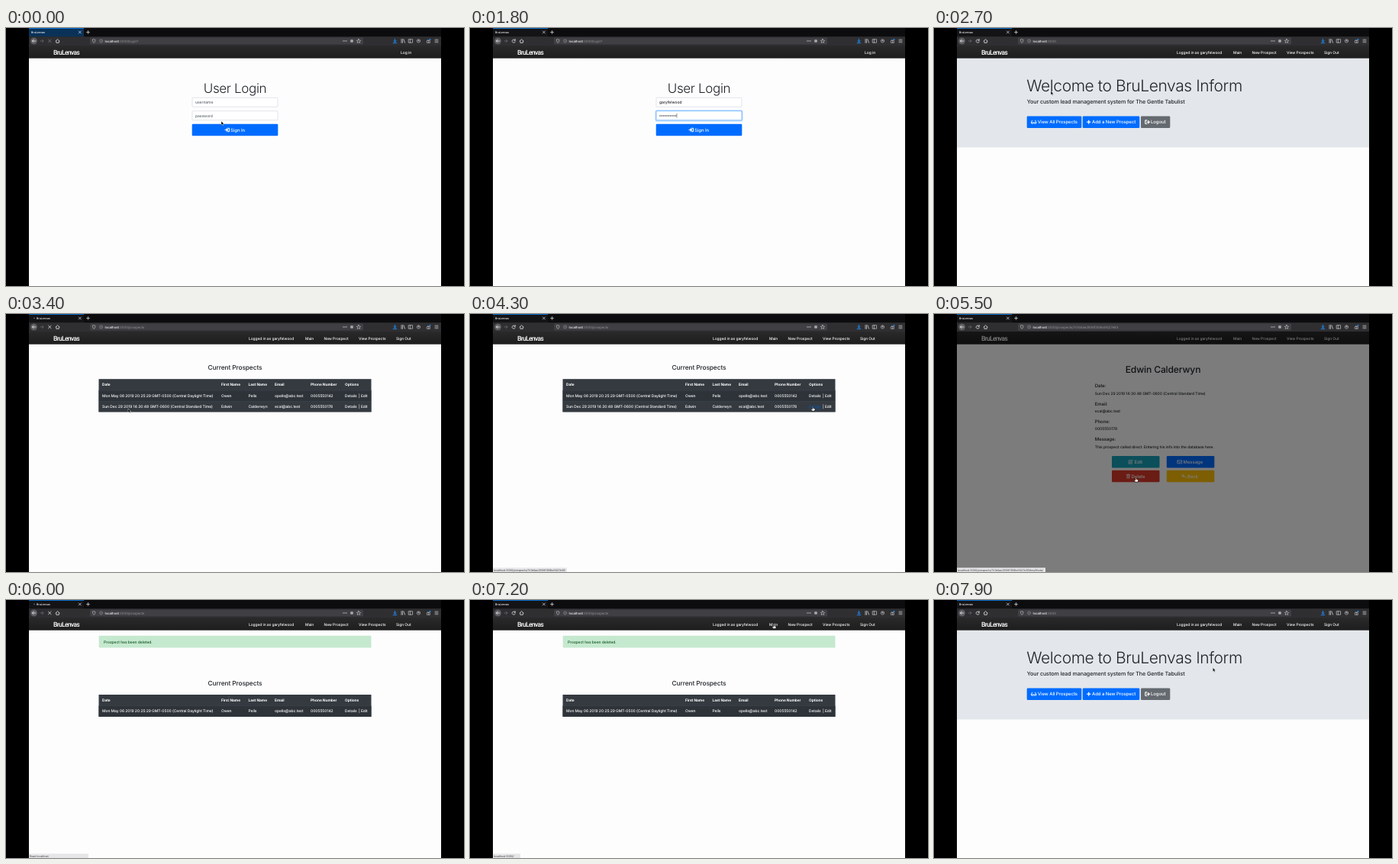
An HTML page that plays this animation: 600 px wide and 338 px high, repeating every 8 s.

```html
<!DOCTYPE html>
<html lang="en">
<head>
<meta charset="utf-8">
<title>Prospect manager demo</title>
<style>
  html, body { margin: 0; width: 100%; height: 100%; overflow: hidden; background: #000; }
  svg { display: block; width: 100vw; height: 100vh; }
  text { font-family: Inter, "Open Sans", sans-serif; letter-spacing: -.012em; text-rendering: geometricPrecision; white-space: pre; }
  .brand { font-family: Roboto, "Open Sans", sans-serif; letter-spacing: -.09em; }
  .title { letter-spacing: -.02em; }
  .line { fill: none; stroke-linecap: round; stroke-linejoin: round; }
</style>
</head>
<body>
<svg id="stage" viewBox="0 0 600 338" xmlns="http://www.w3.org/2000/svg"></svg>
<script>
const LOOP = 8000, STEP = 100;
const BRAND = 'BruLenvas', USER = 'garyfelwood';
const HOST = 'localhost', RECORD = '/prospects/7c1d4ae2906f358bd1427e83';
const INK = '#212529', BLUE = '#006cff', DARK = '#343a40';

// Markup helpers: y is the vertical middle of the capitals
const text = (x, y, str, size = 5, o = {}) =>
  `<text x="${x}" y="${y + size * .36}" font-size="${size}" fill="${o.fill || INK}" ` +
  `font-weight="${o.weight || 450}" text-anchor="${o.anchor || 'start'}" ${o.attr || ''}>${str}</text>`;
const rect = (x, y, w, h, fill, attr = '') =>
  `<rect x="${x}" y="${y}" width="${w}" height="${h}" fill="${fill}" ${attr}/>`;
const line = (d, stroke = '#fff', w = .8) =>
  `<path class="line" d="${d}" stroke="${stroke}" stroke-width="${w}"/>`;
const dot = (x, y, r, fill, attr = '') => `<circle cx="${x}" cy="${y}" r="${r}" fill="${fill}" ${attr}/>`;
const at = (x, y, body) => `<g transform="translate(${x} ${y})">${body}</g>`;
const group = (id, body) => `<g id="${id}">${body}</g>`;

// Icons drawn around their own centre
const icon = {
  signIn: line('M.8-2.3H2.2Q2.8-2.3 2.8-1.6V1.6Q2.8 2.3 2.2 2.3H.8M-2.6 0H.8M-.8-1.6 .9 0-.8 1.6', '#fff', 1.1),
  signOut: line('M-.8-2.3H-2.2Q-2.8-2.3-2.8-1.6V1.6Q-2.8 2.3-2.2 2.3H-.8M-1 0H2.6M1-1.6 2.7 0 1 1.6', '#fff', 1.1),
  glasses: line('M-3.2.7-2.3-2H-1.7M3.2.7 2.3-2H1.7M-3.2.7H-.6V1.4Q-.8 2.2-1.9 2.2T-3.2 1.2ZM3.2.7H.6V1.4Q.8 2.2 1.9 2.2T3.2 1.2ZM-.6.9H.6'),
  plus: line('M-2 0H2M0-2V2', '#fff', 1.3),
  edit: line('M.4-2H-2.5V2.3H1.8V.5M-.8.8-.6-.4 2-2.8 2.9-1.9 .3.6Z', '#fff', .7),
  mail: line('M-2.8-2H2.8V2H-2.8ZM-2.8-1.1 0 .8 2.8-1.1', '#fff', .7),
  trash: line('M-2.3-1.8H2.3M-.8-1.8V-2.6H.8V-1.8M-1.8-1.8-1.6 2.6H1.6L1.8-1.8M-.6-.7V1.6M.6-.7V1.6', '#fff', .6),
  back: line('M2.6 2Q2.6-.6-2.4-.6M-.6-2.4-2.5-.6-.6 1.2', '#fff', .9),
  cross: line('M-1.8-1.8 1.8 1.8M1.8-1.8-1.8 1.8', 'currentColor', .8),
  reload: line('M1.7-1.1A2.1 2.1 0 1 0 2 .8M2-2.3V-.7H.4', '#d8d8da', .8),
};

const button = (x, y, w, h, fill, glyph, gx, tx, label) =>
  rect(x, y, w, h, fill, 'rx="1.3"') + at(gx, y + h / 2, glyph) +
  text(tx, y + h / 2, label, 6, { fill: '#fff', weight: 500 });

const chrome = () => {
  const grey = '#c9c9cc';
  return rect(30, 0, 540, 11.5, '#0c0c0e') + rect(30, 0, 72, 11.5, '#141417') +
    rect(30, 0, 72, 11.5, '#0a3258', 'id="tint"') + rect(30, 0, 72, .9, '#0a78e0') +
    dot(37, 5.5, .8, '#5a87b5', 'id="spin"') +
    text(33, 5.5, BRAND, 3.6, { fill: '#f2f2f4', weight: 500, attr: 'id="tab"' }) +
    line('M95.3 4 98.3 7M98.3 4 95.3 7', '#e6e6e6', .7) + line('M105.5 5.5H109.5M107.5 3.5V7.5', '#e6e6e6', .7) +
    rect(30, 11.2, 540, 11.8, '#2f2f32') + rect(110, 12.4, 358, 9.2, '#404044', 'rx="1"') +
    dot(36.5, 17, 4.5, '#5b5b60') + line('M38.8 17H34.5M36.3 15.1 34.4 17 36.3 18.9', '#eee') +
    line('M45 17H49M47.3 15.2 49.1 17 47.3 18.8', '#68686c') +
    at(57.3, 17, group('reload', icon.reload) + group('stop', icon.cross)) +
    line('M65 17.2 67.6 14.7 70.2 17.2M65.9 16.8V19.4H69.3V16.8', '#ddd', .8) +
    line('M115.2 14.8 117 15.4Q117 18.6 115.2 19.5 113.4 18.6 113.4 15.4Z', grey, .6) +
    line('M126.7 17A2.1 2.1 0 1 1 122.5 17A2.1 2.1 0 1 1 126.7 17M124.6 16.8V18M124.6 15.9V16', '#a0a0a4', .5) +
    [442, 444, 446].map(x => dot(x, 17, .65, grey)).join('') + dot(453, 17, 2.1, '#a4a4a8') +
    line('M462 14.4 462.8 16.2 464.7 16.4 463.3 17.6 463.7 19.5 462 18.5 460.3 19.5 460.7 17.6 459.3 16.4 461.2 16.2Z', grey, .6) +
    line('M509.5 14.3V18M507.8 16.5 509.5 18.2 511.2 16.5M507.3 19.6H511.7', '#1e90ff', .9) +
    line('M518 14.6V19.4M519.6 14.6V19.4M521 14.8 522.6 19.3', grey) +
    line('M527.6 14.8H532.6V19.2H527.6ZM529.4 14.8V19.2', grey, .7) +
    line('M542.7 17A2.2 2.2 0 1 1 538.3 17A2.2 2.2 0 1 1 542.7 17', grey, .6) + dot(540.5, 16.5, .9, grey) +
    line('M551.8 16.6H555.4V19.4H551.8ZM553.6 16.6V19.4M552.6 15.2 553.6 16.4', grey, .6) + dot(555.4, 15, 1.1, '#1e90ff') +
    line('M562 15.2H566M562 17H566M562 18.8H566', grey, .7) +
    `<text x="129.5" y="18.5" font-size="4.35" fill="#f4f4f6" font-weight="500">${HOST}<tspan id="path" fill="#929297" font-weight="400"></tspan></text>`;
};

const navBar = () => {
  const white = { fill: '#fff', weight: 550 };
  const links = [[318, `Logged in as ${USER}`], [392, 'Main'], [416.5, 'New Prospect'],
    [462, 'View Prospects'], [511, 'Sign Out']];
  return rect(30, 23, 540, 16.7, 'url(#nav)') +
    text(62, 32, BRAND, 8.7, { fill: '#fff', attr: 'class="brand"' }) +
    group('guest', text(517, 32, 'Log in', 5, white)) +
    group('member', links.map(([x, s]) => text(x, 32, s, 4.9, white)).join(''));
};

const field = (id, y, hint) =>
  rect(243.2, y - .6, 113.6, 13.7, 'none', `id="${id}Glow" rx="1.6" stroke="#a9d3ff" stroke-width="1.2"`) +
  rect(244, y, 112, 12, '#fff', `id="${id}Box" rx="1" stroke-width=".6"`) +
  text(248, y + 6.2, hint, 5, { attr: `id="${id}Text"` });

const login = () =>
  text(300, 78.4, 'User Login', 17, { weight: 350, anchor: 'middle', attr: 'class="title"' }) +
  field('user', 91.3, 'username') + field('pass', 108.7, 'password') +
  group('dots', Array.from({ length: 10 }, (_, i) => dot(249 + i * 2.27, 115, .75, INK)).join('')) +
  rect(0, 0, .5, 5.6, INK, 'id="caret"') +
  button(243.7, 125.7, 112.6, 15.6, BLUE, icon.signIn, 289.6, 294, 'Sign In');

const welcome = () =>
  rect(30, 39.7, 540, 116.8, '#e3e6ea') +
  text(121.3, 75.6, `Welcome to ${BRAND} Inform`, 21, { weight: 350, attr: 'class="title"' }) +
  text(121.7, 96, 'Your custom lead management system for The Gentle Tabulist', 7.15, { weight: 500 }) +
  button(121.7, 115.4, 71.6, 15.6, BLUE, icon.glasses, 130.6, 135.8, 'View All Prospects') +
  button(194.7, 115.4, 74.6, 15.6, BLUE, icon.plus, 202.7, 207, 'Add a New Prospect') +
  button(271, 115.4, 38.3, 15.6, '#646a70', icon.signOut, 279.6, 284, 'Logout');

const columns = [126, 282, 317.5, 352, 399];
const people = [
  ['Mon May 06 2019 20:25:29 GMT-0500 (Central Daylight Time)', 'Owen', 'Pells', 'opells@abc.test', '0005550142'],
  ['Sun Dec 29 2019 14:30:48 GMT-0600 (Central Standard Time)', 'Edwin', 'Calderwyn', 'ecal@abc.test', '0005550178'],
];
const table = (top, rows, linkId) => {
  const cells = (vals, y, o) => vals.map((s, i) => text(columns[i], y, s, o.size || 4.98, o)).join('');
  const head = { fill: '#fff', weight: 650, size: 4.85 };
  let out = rect(121.5, top, 357, 14.7 + rows.length * 14.2, DARK) +
    cells(['Date', 'First Name', 'Last Name', 'Email', 'Phone Number'], top + 7.4, head) +
    text(444, top + 7.4, 'Options', 4.85, head);
  rows.forEach((row, i) => {
    const y = top + 14.7 + i * 14.2, link = { fill: '#fff', weight: 550 };
    out += rect(121.5, y, 357, 14.2, i % 2 ? DARK : '#2e3339') + rect(121.5, y, 357, .35, '#454d55') +
      cells(row, y + 7, { fill: '#fff' }) +
      text(444, y + 7, 'Details', 4.9, { ...link, attr: i ? `id="${linkId}"` : '' }) +
      text(462, y + 7, '| Edit', 4.9, link);
  });
  return out;
};
const listTitle = y => text(300, y, 'Current Prospects', 8.35, { anchor: 'middle' });

const list = () => listTitle(70) + table(85.2, people, 'details');

const deleted = () =>
  rect(121.7, 46.8, 356.8, 15.7, '#c5e9cf', 'rx="1.2"') +
  text(128, 54.7, 'Prospect has been deleted.', 5, { fill: '#155724' }) +
  listTitle(108.5) + table(124, people.slice(0, 1));

const detail = () => {
  const [date, first, last, email, phone] = people[1];
  const facts = [['Date:', date], ['Email:', email], ['Phone:', phone],
    ['Message:', 'This prospect called direct. Entering his info into the database here.']];
  return text(300, 72.5, `${first} ${last}`, 12.1, { anchor: 'middle' }) +
    facts.map(([k, v], i) => text(210.8, 94.3 + i * 23.2, k, 6, { weight: 500 }) +
      text(210.8, 104.3 + i * 23.2, v, 4.98)).join('') +
    button(233, 186, 62.5, 15.6, '#17a2b8', icon.edit, 257.5, 262.5, 'Edit') +
    button(304.8, 186, 62.5, 15.6, BLUE, icon.mail, 322, 326.5, 'Message') +
    button(233, 204.7, 62.5, 15.6, '#dc3a28', icon.trash, 254.5, 258.5, 'Delete') +
    button(304.8, 204.7, 62.5, 15.6, '#ffc107', icon.back, 327.5, 332, 'Back');
};

// Cursors, each with its hot spot at 0,0
const pointers = {
  arrow: '<path d="M0 0V5L1.2 4 2 5.8 2.9 5.4 2.1 3.7H3.7Z" fill="#000" stroke="#fff" stroke-width=".4"/>',
  beam: line('M-1.2-2.6Q0-2.6 0-1.8 0-2.6 1.2-2.6M0-1.8V1.8M-1.2 2.6Q0 2.6 0 1.8 0 2.6 1.2 2.6', '#555', .6),
  hand: '<path d="M-.6 0Q0-.6.6 0V2L2.6 2.5Q3.2 2.8 3 3.8L2.4 5.6H-.8L-2.4 3.2Q-2 2.4-.6 3.4Z" fill="#fff" stroke="#000" stroke-width=".55"/>',
};

const pages = { login, welcome, list, detail, deleted };
const stage = document.getElementById('stage');
stage.innerHTML =
  '<defs><linearGradient id="nav" x2="0" y2="1"><stop stop-color="#2a2a2b"/><stop offset="1" stop-color="#1d1d1e"/></linearGradient></defs>' +
  rect(0, 0, 600, 338, '#000') + rect(30, 23, 540, 315, '#fdfdfe') +
  Object.entries(pages).map(([id, drawPage]) => group(id, drawPage())).join('') + navBar() +
  rect(30, 23, 540, 315, '#000', 'id="dim" opacity=".51"') + chrome() +
  group('status', rect(30, 332.4, 10, 5.6, '#e6e6e8', 'id="strip"') + text(31, 335.4, '', 3.6, { fill: '#55555a', attr: 'id="note"' })) +
  group('cursor', Object.entries(pointers).map(([id, p]) => group(id, p)).join(''));

const el = Object.fromEntries([...stage.querySelectorAll('[id]')].map(n => [n.id, n]));
const show = (node, on) => node.setAttribute('display', on ? 'inline' : 'none');

// Timeline tables: [start, value] or [from, to, value]
const scenes = [[0, 'login'], [2200, 'welcome'], [3300, 'list'], [4500, 'detail'], [5900, 'deleted'], [7400, 'welcome']];
const paths = { login: ':3000/login?', welcome: ':3000', list: ':3000/prospects', detail: ':3000' + RECORD, deleted: ':3000/prospects' };
const loads = [[-200, 0], [2000, 2300], [3200, 3500], [4400, 4600], [5800, 6300], [7300, 7500]];
const notes = [
  [2100, 2300, 'Read localhost', 78], [3000, 3300, 'localhost:3000/prospects', 54],
  [4200, 4500, 'localhost:3000' + RECORD, 97], [5500, 5900, `localhost:3000${RECORD}#myModal`, 116],
  [5900, 6500, 'Read localhost', 78], [7100, 7400, 'localhost:3000/', 36],
];
const kinds = [[0, 'arrow'], [200, 'beam'], [400, ''], [2300, 'arrow'], [3000, 'hand'], [3300, 'arrow'], [4200, 'hand'],
  [4500, 'arrow'], [5300, 'hand'], [5600, 'arrow'], [5900, 'beam'], [6600, 'arrow'], [7100, 'hand'], [7400, 'arrow']];
const route = [[0, 282, 122], [300, 278, 98], [2300, 278, 98], [2700, 153, 82.5], [3000, 160, 124], [3400, 160, 124],
  [4200, 449, 121.5], [4500, 449, 121.5], [5300, 264.5, 214.5], [5600, 264.5, 214.5], [5900, 292, 129],
  [6400, 292, 129], [7100, 398, 32], [7400, 398, 32], [7900, 365.3, 88.8], [8000, 365.3, 88.8]];

const latest = (rows, t) => rows.filter(r => r[0] <= t).pop()[1];
const during = (rows, t) => rows.find(r => t >= r[0] && t < r[1]);
const place = t => {
  const i = route.findIndex(r => r[0] > t), [t0, x0, y0] = route[i - 1], [t1, x1, y1] = route[i];
  const p = (t - t0) / (t1 - t0), e = p * p * (3 - 2 * p);
  return [x0 + (x1 - x0) * e, y0 + (y1 - y0) * e];
};

function focus(id, on) {
  show(el[id + 'Glow'], on);
  el[id + 'Box'].setAttribute('stroke', on ? '#3f9dfa' : '#ced4da');
}

function drawForm(t) {
  const typed = Math.max(0, Math.min(USER.length, Math.floor((t - 300) / 500 * USER.length)));
  const hidden = Math.max(0, Math.min(10, Math.floor((t - 900) / 90)));
  const inUser = t >= 300 && t < 900, inPass = t >= 900;
  focus('user', inUser);
  focus('pass', inPass);
  el.userText.textContent = typed ? USER.slice(0, typed) : 'username';
  el.userText.setAttribute('fill', typed ? INK : '#5f666d');
  el.passText.setAttribute('fill', '#5f666d');
  show(el.passText, !hidden);
  [...el.dots.children].forEach((d, i) => show(d, i < hidden));
  show(el.caret, inUser || inPass);
  const x = inPass ? 248 + hidden * 2.27 : 248 + (typed ? el.userText.getComputedTextLength() : 0);
  el.caret.setAttribute('x', x);
  el.caret.setAttribute('y', inPass ? 111.9 : 94.5);
}

function draw(t) {
  const scene = latest(scenes, t);
  Object.keys(pages).forEach(id => show(el[id], id === scene));
  show(el.guest, scene === 'login');
  show(el.member, scene !== 'login');
  el.path.textContent = paths[scene];
  if (scene === 'login') drawForm(t);

  const busy = during(loads, t);
  const settling = loads.some(([, end]) => t >= end && t < end + 300);
  show(el.spin, busy);
  show(el.tint, settling);
  show(el.stop, busy || settling);
  show(el.reload, !busy && !settling);
  el.stop.setAttribute('color', busy ? '#e0e0e2' : '#77777b');
  el.tab.setAttribute('x', busy ? 40 : 33);

  const hover = t >= 4200 && t < 4500;
  el.details.setAttribute('fill', hover ? '#0a58a8' : '#fff');
  el.details.setAttribute('text-decoration', hover ? 'underline' : 'none');
  show(el.dim, t >= 5500 && t < 5900);

  const note = during(notes, t);
  show(el.status, note);
  if (note) {
    el.note.textContent = note[2];
    el.strip.setAttribute('width', note[3]);
  }

  const kind = latest(kinds, t);
  Object.keys(pointers).forEach(id => show(el[id], id === kind));
  el.cursor.setAttribute('transform', `translate(${place(t)})`);
}

const start = performance.now();
function tick() {
  const t = (performance.now() - start) % LOOP;
  draw(Math.floor(t / STEP) * STEP);
  requestAnimationFrame(tick);
}
tick();
</script>
</body>
</html>
```
